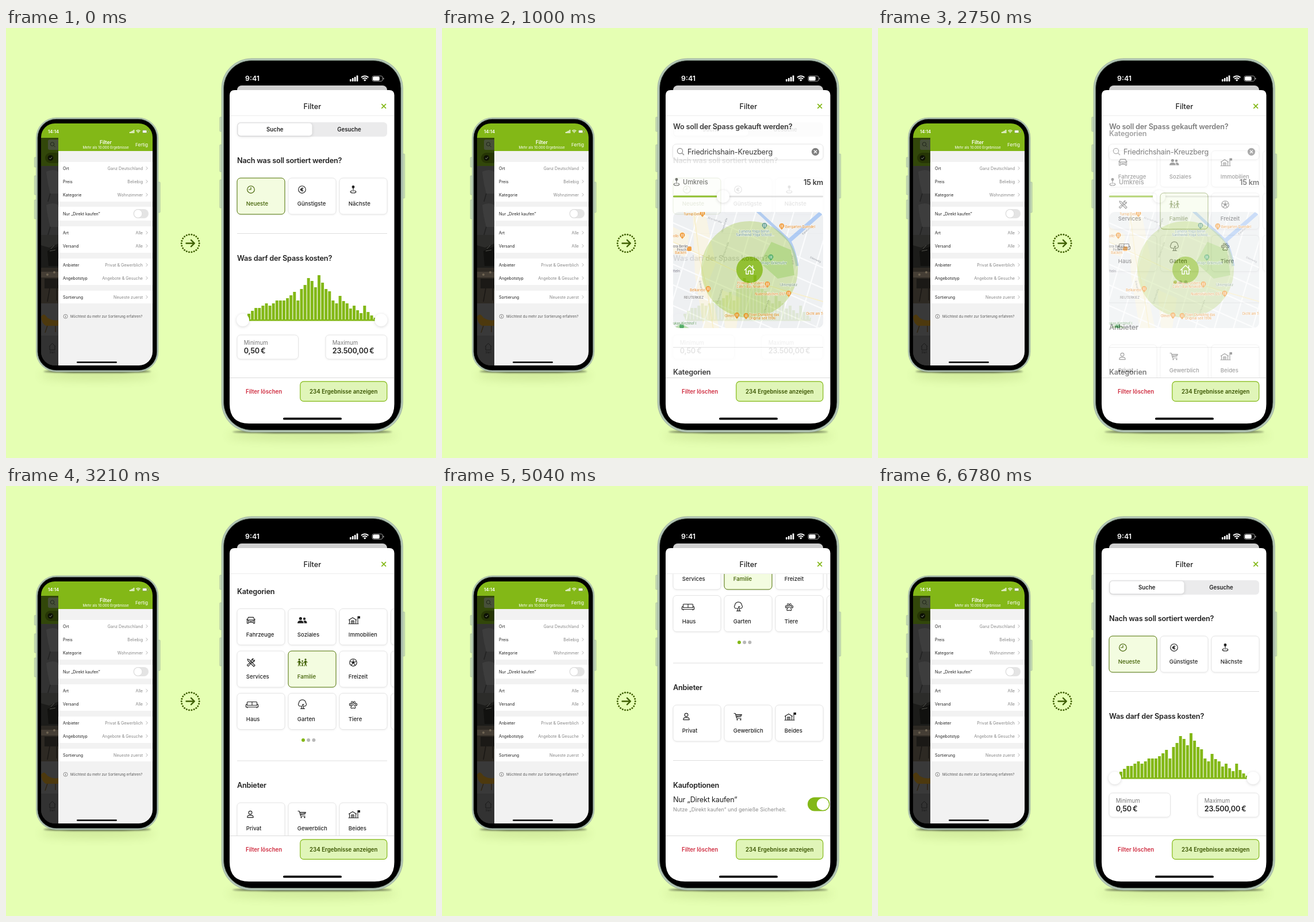
Write an HTML page that moves like this. It is 748 px wide and 748 px high and loops after 6.85 s.

```html
<!DOCTYPE html>
<html lang="de">
<head>
<meta charset="utf-8">
<title>Filter</title>
<style>
html, body { margin: 0; width: 100%; height: 100%; overflow: hidden; background: #e5ffb3; }
svg { display: block; width: 100vw; height: 100vh; font-family: Inter, "Open Sans", sans-serif; }
text { fill: #222; }
.mid { text-anchor: middle; }
.end { text-anchor: end; }
.h { font-size: 12.7px; font-weight: 600; letter-spacing: -.22px; }
.p { font-size: 12.7px; letter-spacing: -.22px; }
.title { font-size: 12.7px; font-weight: 500; }
.clock { font-size: 12.4px; font-weight: 600; fill: #fff; }
.b { font-size: 9.7px; font-weight: 600; }
.c { font-size: 9.6px; font-weight: 500; fill: currentColor; }
.small { font-size: 9.7px; fill: #777; }
.note { font-size: 9.1px; fill: #8c8c8c; }
.row { font-size: 7.1px; }
.val { fill: #858585; }
.map { font-size: 5.6px; font-weight: 500; fill: #e0831c; paint-order: stroke; stroke: #fff; stroke-width: .8px; }
.street { font-size: 4.4px; fill: #8a8f96; }
.card { fill: #fff; stroke: #e4e4e4; filter: drop-shadow(0 1px 1.5px #0000000f); }
.on { fill: #f3fce0; stroke: #4d7000; }
.knob { fill: #fff; filter: drop-shadow(0 1px 2.5px #00000028); }
.icon { fill: none; stroke: currentColor; stroke-width: 1.15; stroke-linejoin: round; stroke-linecap: round; }
.icon .f { fill: currentColor; stroke: none; }
.scene { animation: 6850ms linear infinite; }
#place { animation-name: place; }
#cats { animation-name: cats; }
#more { animation-name: more; }
@keyframes place {
  0%, 11.53% { opacity: 0; } 11.54% { opacity: .33; } 12.85% { opacity: .52; }
  15.2%, 90% { opacity: 1; } 90.01%, 100% { opacity: 0; }
}
@keyframes cats {
  0%, 39.55% { opacity: 0; } 39.56% { opacity: .33; } 40.88% { opacity: .52; }
  43.2%, 90% { opacity: 1; } 90.01%, 100% { opacity: 0; }
}
@keyframes more {
  0%, 67.58% { opacity: 0; } 67.59% { opacity: .33; } 68.9% { opacity: .52; }
  71.2%, 95.46% { opacity: 1; } 95.47% { opacity: .66; } 96.79% { opacity: .46; }
  98.9%, 100% { opacity: 0; }
}
</style>
</head>
<body>
<svg id="stage" viewBox="0 0 748 748"></svg>
<script>
const GREEN = '#83b817', DARK = '#3f5f00';

const text = (x, y, s, cls, attr = '') => `<text x="${x}" y="${y}" class="${cls}" ${attr}>${s}</text>`;
const rect = (x, y, w, h, r, fill, attr = '') =>
  `<rect x="${x}" y="${y}" width="${w}" height="${h}" rx="${r}" ${fill ? `fill="${fill}"` : ''} ${attr}/>`;
const circle = (x, y, r, fill, attr = '') =>
  `<circle cx="${x}" cy="${y}" r="${r}" ${fill ? `fill="${fill}"` : ''} ${attr}/>`;
const line = (d, stroke, w = 1, attr = '') =>
  `<path d="${d}" fill="none" stroke="${stroke}" stroke-width="${w}" ${attr}/>`;
const rule = (y, x = 402, end = 663, color = '#dedede') => line(`M${x} ${y}H${end}`, color);
const knob = (x, y, r = 11) => circle(x, y, r, '', 'class="knob"');
const dot = (x, y, r) => circle(x, y, r, '', 'class="f"');
const solid = d => `<path class="f" d="${d}"/>`;
const path = d => `<path d="${d}"/>`;

const icons = {
  clock: circle(0, 0, 6.3) + path('M0-3.6V0H-3.4'),
  euro: circle(0, 0, 6.3) + path('M2-2.1A2.5 2.5 0 1 0 2 2.1M-2.9-.7H.8M-2.9 .8H.8'),
  pin: circle(0, -4.6, 1.9, 'currentColor') + path('M0-3V3M-2 2C-7 3 -5 6 0 6S7 3 2 2'),
  car: path('M-6.5 5.5V-.2L-4.4-5.2H4.4L6.5-.2V5.5H4.4V3.6H-4.4V5.5zM-6.5-.4H6.5M-1.5 2H1.5M-7.5-1.5H-6M6-1.5H7.5') + dot(-4, 1.6, 1) + dot(4, 1.6, 1),
  people: dot(-2.6, -3, 2.6) + dot(4, -2.6, 2.2) + solid('M-8 5.2Q-8 .4-2.6.4T2.8 5.2zM3.8 5.2Q3.8 2.4 2.4.8Q8.6-.6 8.6 5.2z'),
  house: path('M-6.5 6.2V-1.2M4.5 6.2V-1.2M-7.5-.6L-1-4.6 5.5-.6M-8 6.2H9M-3.2 6V1H1.2V6M8 6V-6.5M-1 1V6') + solid('M8-7H12V-3H8z'),
  tools: path('M-6-6L-3-5 4.5 2.5M-6-6L-5-3 2.5 4.5M2.5 4.5L5 7 7 5 4.5 2.5M6.6-4.2L4.2-2.8 2.8-4.2 4.2-6.6A3.6 3.6 0 0 0 .8-2.2L-6.6 4.6-4.6 6.6 2.2-.8A3.6 3.6 0 0 0 6.6-4.2z'),
  family: dot(-4.8, -5.2, 1.6) + dot(6, -5.2, 1.6) + dot(.6, -2.4, 1.3)
    + path('M-4.8-2.4V1.5L-6.6 6M-4.8 1.5L-3.2 6M-8-.4L-4.8-2.6-.9 1.4M6-2.4V1.5L7.8 6M6 1.5L4.4 6M9.2-.4L6-2.6 2 1.4M.6 0V3L-.6 6M.6 3L1.8 6') + solid('M-6.4-3H-3.2L-3.4 2H-6.2zM4.4-3H7.6L7.4 2H4.6z'),
  ball: circle(0, 0, 6.3) + solid('M0-2.6L2.5-.8 1.5 2.1H-1.5L-2.5-.8z') + path('M0-2.6V-5M2.5-.8L5.6-2M1.5 2.1L3.4 4.9M-1.5 2.1L-3.4 4.9M-2.5-.8L-5.6-2'),
  sofa: path('M-6.5-.5V-4Q-6.5-5-5.5-5H9.5Q10.5-5 10.5-4V-.5M2-5V1M-6.5 1V-.3Q-8.6-1.4-8.6.6V4H12.6V.6Q12.6-1.4 10.5-.3V1zM-6.5 4V5.6M10.5 4V5.6'),
  tree: path('M-.5 6.8V2.5H-4A3.4 3.4 0 0 1-5.5-3.2 5.6 5 0 0 1 6.5-3.2 3.4 3.4 0 0 1 5 2.5H2.5V6.8M-2.5 6.8H4.5M1 2.5V-1M1 1L3-.8'),
  paw: path('M0 0Q2 0 3 2.4T3.4 6Q1.8 6.4 0 5.4Q-1.8 6.4-3.4 6T-3 2.4T0 0z')
    + [[-2, -4], [2, -4], [-5.2, -.4], [5.2, -.4]].map(([x, y]) => `<ellipse cx="${x}" cy="${y}" rx="1.4" ry="2"/>`).join(''),
  person: circle(-1, -2.8, 2.9) + path('M-6.2 5.6Q-6.2 1.8-2.5 1.8H.5Q4.2 1.8 4.2 5.6z'),
  cart: path('M-7-5.5H-4.8L-2.4 3H5.2M-4.2-3.5H6.4L5-.2-3.2.6M-2-3.5L-1 .4M1.4-3.5V.2M4.2-3.5L3.4 0') + dot(-1.4, 5.4, 1.2) + dot(4.4, 5.4, 1.2)
};
const icon = (name, x, y) => `<g class="icon" transform="translate(${x} ${y})">${icons[name]}</g>`;

const card = (x, y, name, label, on) => `<g color="${on ? DARK : '#222'}">`
  + rect(x + .5, y + .5, 83, 63, 6, '', `class="card${on ? ' on' : ''}"`)
  + icon(name, x + 24.5, y + 20.5) + text(x + 16.3, y + 48.6, label, 'c') + '</g>';
const cards = (y, list, on = -1) => list.map(([name, label], i) => card(401.5 + i * 89, y, name, label, i === on)).join('');

const status = (x, y, s) => `<g transform="translate(${x} ${y}) scale(${s})">`
  + [4, 6, 8, 10.5].map((h, i) => rect(i * 3.9, -h, 2.7, h, .8, '#fff')).join('')
  + line('M20-7a8.8 8.8 0 0 1 12.4 0M22.2-4.4a5.6 5.6 0 0 1 8 0', '#fff', 2)
  + '<path fill="#fff" d="M24-2.6a3.2 3.2 0 0 1 4.4 0L26.2-.3z"/>'
  + rect(39, -9.6, 18, 9.2, 2.6, 'none', 'stroke="#999"') + rect(40.2, -8.4, 11.6, 6.8, 1.6, '#fff')
  + rect(58, -6.6, 1.5, 3.2, .7, '#999') + '</g>';

const phone = (x, y, w, h, r, left, right) => {
  const key = (kx, [ky, kh]) => rect(kx, ky, 3.6, kh, 1, '#c6dcb4', 'stroke="#a3b898" stroke-width=".6"');
  const cx = x + w / 2, base = y + h;
  const rim = w / 90;
  return `<ellipse cx="${cx}" cy="${base + 6}" rx="${w * .47}" ry="9" fill="#4a6400" opacity=".14" style="filter:blur(8px)"/>`
    + `<ellipse cx="${cx}" cy="${base - .5}" rx="${w * .44}" ry="2.6" opacity=".6" style="filter:blur(1.8px)"/>`
    + left.map(k => key(x - 3.2, k)).join('') + right.map(k => key(x + w - .4, k)).join('')
    + rect(x, y, w, h, r, '#b3c6b5', 'stroke="#93a696" stroke-width=".6"')
    + rect(x + rim, y + rim, w - 2 * rim, h - 2 * rim, r - rim, '#000', 'stroke="#6b7c6e" stroke-width=".8"');
};

function oldScreen() {
  const rows = [['Ort', 'Ganz Deutschland', 244], ['Preis', 'Beliebig', 267], ['Kategorie', 'Wohnzimmer', 290],
    ['Art', 'Alle', 356], ['Versand', 'Alle', 379], ['Anbieter', 'Privat &amp; Gewerblich', 412],
    ['Angebotstyp', 'Angebote &amp; Gesuche', 435], ['Sortierung', 'Neueste zuerst', 468]];
  const groups = [[233, 69], [311, 24], [345, 46], [401, 46], [457, 22]];
  const chair = y => `<path fill="#3d3d3d" d="M70 ${y}Q82 ${y - 6} 91 ${y}V${y + 38}H77Q72 ${y + 20} 70 ${y}z"/>`
    + line(`M77 ${y + 38}L73 ${y + 52}`, '#222', 1.5);
  return '<g clip-path="url(#oldClip)">' + rect(61, 166, 194, 48, 0, GREEN)
    // dimmed page behind the panel
    + rect(61, 191, 30, 396, 0, '#333') + rect(61, 191, 30, 49, 0, '#32470a')
    + rect(73, 194, 22, 18, 3, '#475039') + circle(80.5, 202, 3.2, 'none', 'stroke="#20251a"') + line('M83 204.5L85.5 207', '#20251a')
    + rect(68, 217, 30, 18, 9, '#263505') + circle(77.5, 226, 4.8, '#0c1004') + line('M75.3 226L77 227.8 80 224.3', '#8a9480', 1)
    + chair(250) + chair(308)
    + rect(61, 360, 30, 57, 0, '#1c1c1a') + '<path fill="#2c2c2a" d="M61 360H91V375L75 382 61 378z"/><path fill="#11110f" d="M72 388L91 380V414H74z"/>'
    + line('M78 384L84 378M76 388L86 386', '#55554f', 1)
    + rect(61, 417, 30, 62, 0, '#2d2923') + rect(61, 424, 30, 10, 0, '#453e35') + rect(67, 436, 24, 17, 0, '#1b1916')
    + circle(72, 429, 2, '#6f6553') + circle(84, 425, 2, '#6f6553') + line('M76 453L72 476M88 453V474', '#1a1714', 1.5)
    + rect(61, 479, 30, 56, 0, '#393939') + '<path fill="#4d390e" d="M61 502Q66 494 72 504Q82 510 91 508V518H70Q62 515 61 502z"/>' + line('M72 518L68 530M86 518V529', '#2f2514', 1.5)
    + rect(61, 535, 30, 52, 0, '#323232') + line('M75 554L80.5 548.5 86 554M76 553V560H85V553', '#1a1a1a', 1)
    + text(80.5, 566, 'Start', 'mid', 'style="font-size:4.5px;fill:#1c1c1c"')
    // header
    + rect(91, 190, 164, 24, 0, GREEN)
    + text(73, 182.6, '14:14', 'clock', 'style="font-size:7.7px"') + status(215, 183, .57)
    + text(173.5, 202, 'Filter', 'mid', 'style="font-size:8.5px;font-weight:600;fill:#fff"')
    + text(173.5, 210.4, 'Mehr als 10.000 Ergebnisse', 'mid', 'style="font-size:6.15px;fill:#fff"')
    + text(247, 206, 'Fertig', 'end', 'style="font-size:8.1px;fill:#fff"')
    // list
    + rect(91, 214, 164, 373, 0, '#f2f2f2')
    + groups.map(([y, h]) => rect(91, y, 164, h, 0, '#fff')).join('')
    + rows.map(([k, v, y]) => text(99, y + 2.6, k, 'row') + text(238, y + 2.6, v, 'row val end')
      + line(`M243.5 ${y - 2.7}L246.3 ${y} 243.5 ${y + 2.7}`, '#aaa', .9)).join('')
    + text(99, 325.6, 'Nur „Direkt kaufen“', 'row')
    + rect(221.5, 315, 26.5, 16, 8, '#e4e4e4') + circle(229.7, 323, 7.2, '#fff', 'stroke="#d0d0d0" stroke-width=".6"')
    + circle(103.5, 501.7, 3.5, 'none', 'stroke="#666" stroke-width=".7"') + line('M103.5 501V503.6M103.5 499.6V500.3', '#555', .8)
    + text(112, 503.9, 'Möchtest du mehr zur Sortierung erfahren?', '', 'style="font-size:6.13px;fill:#555"')
    + rect(123, 580.2, 70, 2.6, 1.3, '#000') + '</g>';
}

function badge() {
  const dots = 22;
  let s = '';
  for (let i = 0; i < dots; i++) {
    const a = i * 2 * Math.PI / dots;
    s += circle(320.7 + 15.5 * Math.cos(a), 374.5 + 15.5 * Math.sin(a), 1.5, DARK);
  }
  return s + line('M313.5 374.5H327M322 368.8L327.8 374.5 322 380.2', DARK, 2.4, 'stroke-linecap="round" stroke-linejoin="round"');
}

function sortScene() {
  const tops = [497, 492, 487, 487, 483, 479, 483, 479, 474, 474, 474, 470, 465, 459, 474, 454, 447, 435, 440, 451, 430,
    443, 454, 458, 474, 479, 466, 475, 479, 488, 483, 491, 496, 483, 494, 500, 504];
  const box = (x, label, value) => rect(x + .5, 534, 106.5, 42, 6, '', 'class="card"')
    + text(x + 12.3, 550.5, label, 'small') + text(x + 12.3, 566.3, value, 'h');
  return rect(402, 164, 261, 25, 6, '#ebebec') + rect(403.5, 165.5, 129, 22, 5, '', 'class="knob"')
    + text(467.8, 180, 'Suche', 'b mid') + text(597, 180, 'Gesuche', 'b mid')
    + text(402, 235, 'Nach was soll sortiert werden?', 'h')
    + cards(260.5, [['clock', 'Neueste'], ['euro', 'Günstigste'], ['pin', 'Nächste']], 0)
    + rule(357.5) + text(402, 404.5, 'Was darf der Spass kosten?', 'h')
    + tops.map((y, i) => rect((420 + i * 6.1).toFixed(1), y, 5, 509 - y, 0, GREEN)).join('')
    + rect(412, 507, 240, 2.6, 0, GREEN) + knob(412, 508) + knob(652.5, 508)
    + box(401.5, 'Minimum', '0,50&#8201;€') + box(555.5, 'Maximum', '23.500,00&#8201;€');
}

function cityMap() {
  const pin = (x, y, c = '#f0932b') => `<path fill="${c}" d="M${x} ${y + 6}L${x - 4} ${y + 1}A4.4 4.4 0 1 1 ${x + 4} ${y + 1}z"/>`
    + line(`M${x - 1.2} ${y - 3}V${y + 2}M${x + 1.4} ${y - 3}V${y + 2}`, '#fff', .9);
  const label = (x, y, s, cls = '', c = '') => text(x, y, s, 'map ' + cls, c && `style="fill:${c}"`);
  const street = (x, y, a, s) => text(x, y, s, 'street', `transform="rotate(${a} ${x} ${y})"`);
  let roads = '';
  for (let i = 0; i < 9; i++) {
    roads += `M${385 + i * 33} 530L${450 + i * 33} 310`;
    if (i < 7) roads += `M395 ${300 + i * 36}L670 ${420 + i * 36}`;
  }
  return '<g clip-path="url(#mapClip)">' + rect(402, 320, 261, 202, 0, '#eceef1')
    + '<path fill="#f8f3e2" d="M436 320H458L476 410 464 440 482 522H455L440 430zM402 346L430 360 424 398 402 392zM486 455L520 470 512 522H492z"/>'
    + line(roads, '#fbfcfd', 2.2) + line('M438 318L448 400 462 460 472 524M402 372L560 446 663 476', '#f8edc4', 1.8)
    + '<path fill="#b7dba9" d="M573 372L607 386 613 430 584 436 553 408zM402 522L416 514 430 522z"/>'
    + line('M546 316Q585 352 604 370Q612 382 618 414', '#a9c6ee', 5) + line('M603 371L668 314', '#a6c6f3', 7)
    + street(462, 331, 20, 'Ahornstraße') + street(488, 356, -71, 'Ulmenstraße') + street(447, 440, 78, 'Erlenallee')
    + street(490, 400, -71, 'Weidenstraße') + street(607, 394, 80, 'Uferweg') + street(640, 400, 24, 'Eibenweg')
    + street(480, 480, -71, 'Lindenstraße') + street(560, 500, -71, 'Fichtenstraße') + street(628, 360, -42, 'Kanalufer')
    + circle(535, 420, 84, '#9cc63a', 'opacity=".4"')
    + pin(453, 323) + pin(591, 345) + pin(418, 361) + pin(463, 454) + pin(566, 446) + pin(603, 462) + pin(513, 500) + pin(529, 501)
    + pin(561, 344, '#5e9a8c') + pin(572, 399, '#3fa455') + circle(417, 519, 4, '#3fa455') + rect(426, 380, 8, 8, 2, '#f0932b')
    + label(449, 326, 'Turnip Deli', 'end') + label(597, 348, 'Biergarten Quendel') + label(402, 364, 'ollo')
    + label(402, 382, 'ora Berlin', '', '#555') + label(425, 388, 'Frisch', 'end', '#555') + label(425, 393, 'Backen', 'end')
    + label(543, 356, 'Lumena Yoga Berlin', 'mid', '#5f8d80') + label(545, 362, 'Sanftwind Yoga School…', 'mid', '#5f8d80')
    + label(576, 411, 'Anlage Birkenufer', 'mid', '#4c8a4c') + label(603, 449, 'Ulmenplatz', 'mid', '#6a8a6a')
    + label(458, 458, 'Belkarimo', 'end') + label(537, 446, 'Florinde &amp; Osbert', 'mid') + label(538, 452, 'Café / Bar Neukölln', 'mid')
    + label(598, 465, 'Nudelstübchen OST', 'end') + label(508, 503, 'Olmer', 'end')
    + label(534, 501, 'Town Dumpling das') + label(534, 507, 'Original seit 1996') + label(634, 499, 'Dicht am Teich')
    + label(402, 425, 'tteln', '', '#667') + label(402, 516, 'ukas Kirchhof I', '', '#4c8a4c') + label(421, 471, 'REUTERKIEZ', '', '#666')
    + circle(535, 420.5, 23, GREEN)
    + line('M526.5 421L535 413 543.5 421M529 419.5V428H533V422.5H537V428H541V419.5M540.5 417.5V413.5', '#fff', 1.5, 'stroke-linejoin="round" stroke-linecap="round"')
    + '</g>';
}

function placeScene() {
  return text(402, 176.2, 'Wo soll der Spass gekauft werden?', 'h')
    + rect(401.5, 202, 261.5, 27, 6, '', 'class="card"')
    + circle(414, 214, 4.6, 'none', 'stroke="#777" stroke-width="1.2"') + line('M417.4 217.4L421 221', '#777', 1.3)
    + text(427, 219.8, 'Friedrichshain-Kreuzberg', 'p')
    + circle(649.5, 215.3, 6.6, '#6e6e6e') + line('M647 212.8L652 217.8M652 212.8L647 217.8', '#fff', 1.3)
    + `<g color="#666">${icon('pin', 408, 268)}</g>`
    + text(419, 272.4, 'Umkreis', '', 'style="font-size:11.1px;font-weight:500;fill:#666"') + text(663, 272.7, '15 km', 'h end')
    + rect(402, 291.8, 261, 2.6, 1.3, '#dedede') + rect(402, 291.5, 87, 3, 1.5, GREEN) + knob(489, 293)
    + cityMap() + rule(555.5) + text(402, 603, 'Kategorien', 'h');
}

function catPage() {
  const rows = [
    [213, [['car', 'Fahrzeuge'], ['people', 'Soziales'], ['house', 'Immobilien']]],
    [286.5, [['tools', 'Services'], ['family', 'Familie'], ['ball', 'Freizeit']], 1],
    [360, [['sofa', 'Haus'], ['tree', 'Garten'], ['paw', 'Tiere']]]
  ];
  return text(402, 188, 'Kategorien', 'h')
    + rows.map(r => cards(...r) + rect(669.5, r[0] + .5, 83, 63, 6, '', 'class="card"')).join('')
    + [GREEN, '#b8b8b8', '#b8b8b8'].map((c, i) => circle(517 + i * 9.2, 442, 3, c)).join('')
    + rule(478) + text(402, 525, 'Anbieter', 'h')
    + cards(550.5, [['person', 'Privat'], ['cart', 'Gewerblich'], ['house', 'Beides']])
    + rule(647.5) + text(402, 694.5, 'Kaufoptionen', 'h') + text(402, 720.3, 'Nur „Direkt kaufen“', 'p')
    + text(402, 735.8, 'Nutze „Direkt kaufen“ und genieße Sicherheit.', 'note')
    + rect(636, 711.5, 38.5, 24, 12, GREEN) + circle(662.5, 723.5, 10.6, '#fff');
}

const scene = (id, body, dy = 0) =>
  `<g id="${id}" ${id === 'sort' ? '' : 'class="scene"'}>${rect(389, 152, 286, 456, 0, '#fff')}<g transform="translate(0 ${dy})">${body}</g></g>`;

document.getElementById('stage').innerHTML = '<defs>'
  + `<clipPath id="oldClip">${rect(61, 166, 194, 421, 24)}</clipPath>`
  + `<clipPath id="mapClip">${rect(402, 320, 261, 202, 10)}</clipPath>`
  + `<clipPath id="view">${rect(389, 152, 286, 456, 0)}</clipPath></defs>`
  + phone(52.5, 156, 212.5, 442, 35, [[225, 17], [257, 33], [299, 33]], [[268, 53]]) + oldScreen() + badge()
  + phone(375, 53, 315.5, 650, 52, [[155, 25], [203, 47], [264, 49]], [[219, 77]])
  + text(416, 92.3, '9:41', 'clock') + status(598, 93, 1)
  + rect(402, 100, 261, 20, 8, '#cfcfcf')
  + '<path fill="#fff" d="M389 117Q389 108 398 108H666.5Q675.5 108 675.5 117V654Q675.5 688 641 688H423Q389 688 389 654z"/>'
  + text(532.8, 140.6, 'Filter', 'title mid') + line('M653.3 132.2L661 139.9M661 132.2L653.3 139.9', GREEN, 1.7)
  + '<g clip-path="url(#view)">' + scene('sort', sortScene()) + scene('place', placeScene())
  + scene('cats', catPage()) + scene('more', catPage(), -170) + '</g>'
  + rule(152.5, 389, 675, '#ededed') + rule(608.5, 389, 675, '#dcdcdc')
  + text(417, 636, 'Filter löschen', 'b', 'style="fill:#cf2b3f"')
  + rect(511.8, 614.8, 151, 34.6, 6, '#e0f5b8', `stroke="${GREEN}" stroke-width="1.2"`)
  + text(587.3, 636, '234 Ergebnisse anzeigen', 'b mid', 'style="fill:#3a5500"')
  + rect(482, 677.8, 102, 3.8, 1.9, '#000');
</script>
</body>
</html>
```
